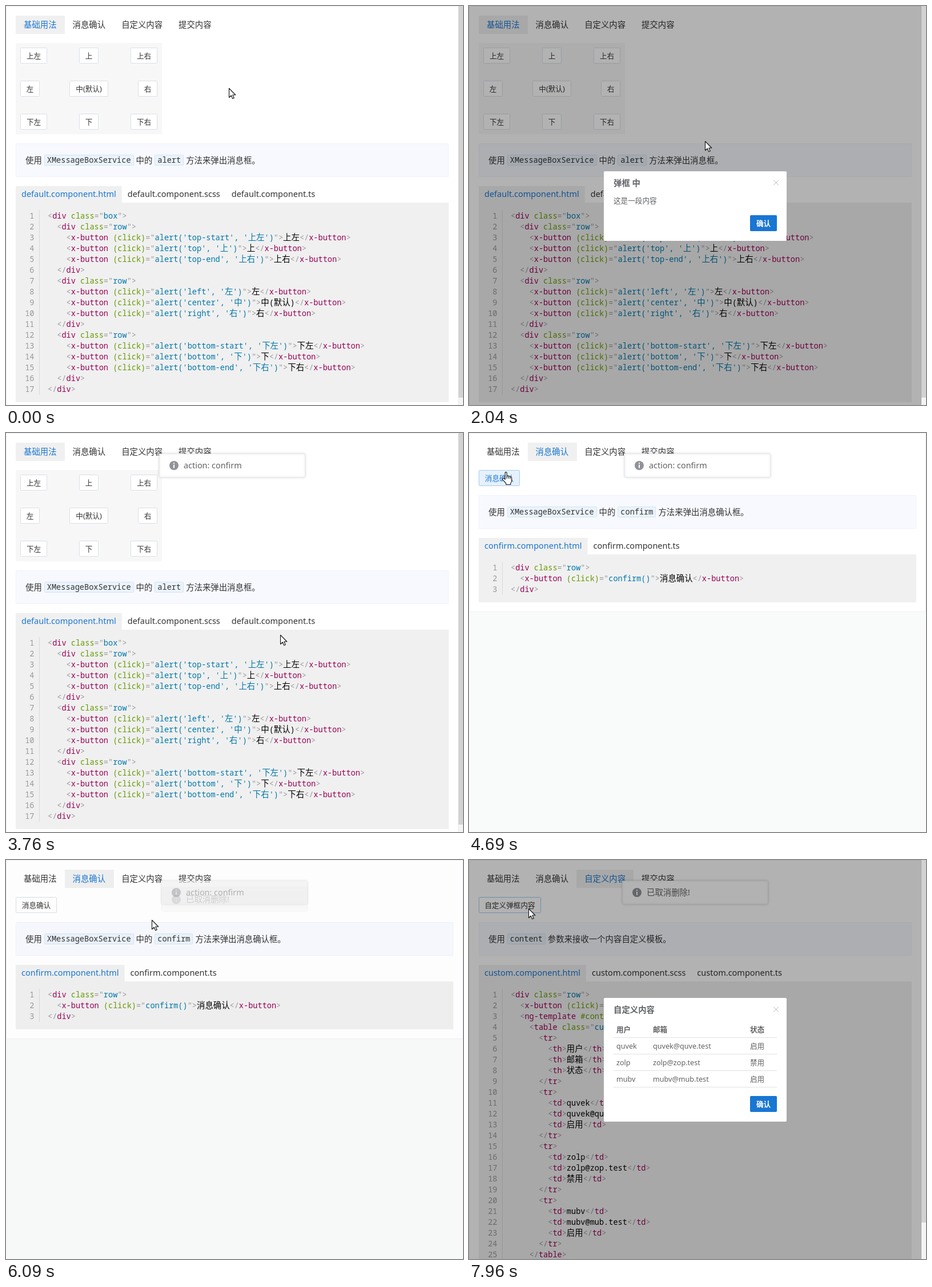
Write an HTML page with a canvas that moves like this. It is 800x700 px and loops after 8 s.

```html
<!DOCTYPE html>
<html lang="zh-CN">
<head>
<meta charset="utf-8">
<title>Message box demo</title>
<style>
html, body { margin: 0; width: 100%; height: 100%; overflow: hidden; background: #f9fafa; }
canvas { display: block; }
</style>
</head>
<body>
<canvas id="stage" width="800" height="700"></canvas>
<script>
const ctx = document.getElementById('stage').getContext('2d');
const LOOP = 8000, STEP = 156.2, MASK = 0.3;
const SANS = '"Noto Sans", "Noto Sans CJK SC", "Noto Sans CJK", sans-serif';
const CJK = '"Noto Sans CJK SC", "Noto Sans CJK", sans-serif';
const MONO = '"Noto Sans Mono", "Noto Sans CJK SC", monospace';
const font = (size, family = SANS, weight = '') => `${weight} ${size}px ${family}`;
const BODY = font(14.4), SMALL = font(12.6), LATIN = font(14.5);
const CODE = font(13.6, MONO), CODE_CJK = font(14.4, CJK);
const INK = '#333', BLUE = '#1976d2', GREY = '#606266';

const clamp = v => Math.max(0, Math.min(1, v));
const ramp = (t, start, length) => clamp((t - start) / length);

// ---------- content ----------
const button = (click, label) => `    <x-button (click)="alert('${click}', '${label[0] === '中' ? '中' : label}')">${label}</x-button>`;
const row = items => ['  <div class="row">', ...items.map(i => button(...i)), '  </div>'];
const cells = (tag, values) => ['      <tr>', ...values.map(v => `        <${tag}>${v}</${tag}>`), '      </tr>'];
const HEAD = ['用户', '邮箱', '状态'];
const USERS = [
  ['quvek', 'quvek@quve.test', '启用'],
  ['zolp', 'zolp@zop.test', '禁用'],
  ['mubv', 'mubv@mub.test', '启用']
];
const TABS = ['基础用法', '消息确认', '自定义内容', '提交内容'];

const PAGES = [
  {
    width: 792, thumb: 687, height: 711, infoY: 241,
    buttons: [
      ['上左', 25, 73, 47], ['上', 128, 73, 34], ['上右', 218, 73, 47],
      ['左', 25, 131, 34], ['中(默认)', 111, 131, 68], ['右', 231, 131, 34],
      ['下左', 25, 189, 47], ['下', 128, 189, 34], ['下右', 218, 189, 47]
    ],
    info: ['使用', '`XMessageBoxService', '中的', '`alert', '方法来弹出消息框。'],
    files: ['default.component.html', 'default.component.scss', 'default.component.ts'],
    code: [
      '<div class="box">',
      ...row([['top-start', '上左'], ['top', '上'], ['top-end', '上右']]),
      ...row([['left', '左'], ['center', '中(默认)'], ['right', '右']]),
      ...row([['bottom-start', '下左'], ['bottom', '下'], ['bottom-end', '下右']]),
      '</div>'
    ]
  },
  {
    width: 800, height: 313, infoY: 109,
    buttons: [['消息确认', 17, 65, 72]],
    info: ['使用', '`XMessageBoxService', '中的', '`confirm', '方法来弹出消息确认框。'],
    files: ['confirm.component.html', 'confirm.component.ts'],
    code: ['<div class="row">', '  <x-button (click)="confirm()">消息确认</x-button>', '</div>']
  },
  {
    width: 792, thumb: 636, height: 900, infoY: 109,
    buttons: [['自定义弹框内容', 17, 65, 109]],
    info: ['使用', '`content', '参数来接收一个内容自定义模板。'],
    files: ['custom.component.html', 'custom.component.scss', 'custom.component.ts'],
    code: [
      '<div class="row">',
      '  <x-button (click)="alertCustom()">自定义弹框内容</x-button>',
      '  <ng-template #contentTpl>',
      '    <table class="custom-table">',
      ...cells('th', HEAD), ...USERS.flatMap(u => cells('td', u)),
      '    </table>'
    ]
  }
];

const DIALOGS = [
  { open: 1094, close: 2960, height: 122, title: '弹框 中', text: '这是一段内容' },
  { open: 4700, close: 5770, height: 122, title: '消息确认', text: '此操作将永久删除此条数据,是否继续?', cancel: true },
  { open: 7660, close: Infinity, height: 217, title: '自定义内容', table: true }
];

const TOASTS = [
  { start: 3240, end: 5985, text: 'action: confirm' },
  { start: 6030, end: Infinity, text: '已取消删除!' }
];

// time, x, y
const PATH = [
  [0, 390, 144], [200, 390, 144], [312, 330, 147], [780, 132, 128], [1000, 132, 128],
  [1090, 148, 140], [1300, 148, 140], [2030, 413, 237], [2180, 414, 346], [2600, 414, 346],
  [2930, 515, 388], [3700, 515, 388], [4210, 146, 33], [4380, 146, 33], [4680, 63, 68],
  [4900, 63, 68], [5600, 465, 381], [5780, 465, 381], [6092, 255, 105], [6400, 240, 35],
  [6750, 240, 35], [7180, 130, 80], [7490, 104, 85], [8000, 104, 85]
];

// ---------- drawing helpers ----------
function rect(x, y, w, h, color) {
  ctx.fillStyle = color;
  ctx.fillRect(x, y, w, h);
}

function panel(x, y, w, h, fill, border, radius = 1) {
  ctx.beginPath();
  ctx.roundRect(x + 0.5, y + 0.5, w - 1, h - 1, radius);
  ctx.fillStyle = fill;
  ctx.fill();
  ctx.strokeStyle = border;
  ctx.lineWidth = 1;
  ctx.stroke();
}

// Draws text and returns where it ends.
function text(str, x, y, face, color) {
  ctx.font = face;
  ctx.fillStyle = color;
  ctx.fillText(str, x, y);
  return x + ctx.measureText(str).width;
}

function textWidth(str, face) {
  ctx.font = face;
  return ctx.measureText(str).width;
}

// ---------- code block ----------
function tokens(line) {
  const out = [];
  for (const [all, open, name, attrs, end] of line.matchAll(/(<\/?)([\w-]+)([^>]*)(>)|[^<]+/g)) {
    if (!open) { out.push([all, '#000']); continue; }
    out.push([open, '#999'], [name, '#905']);
    for (const [, gap, key, eq, value, quote] of attrs.matchAll(/(\s*)([^=\s]+)(?:(=")([^"]*)("))?/g)) {
      out.push([gap + key, '#690']);
      if (eq) out.push([eq, '#999'], [value, '#07a'], [quote, '#999']);
    }
    out.push([end, '#999']);
  }
  return out;
}

function codeLine(line, y) {
  let x = 73;
  for (const [str, color] of tokens(line)) {
    for (const part of str.split(/([\u2e80-\uffff]+)/)) {
      if (part) x = text(part, x, y, part[0] > '\u2e80' ? CODE_CJK : CODE, color);
    }
  }
}

function codeBlock(page, y) {
  const right = page.width - 17, top = y + 28.5, n = page.code.length;
  let x = 17;
  page.files.forEach((file, i) => {
    const w = textWidth(file, LATIN) + 20;
    if (!i) rect(x, y, w, 29, '#f0f0f0');
    text(file, x + 10, y + 19, LATIN, i ? INK : BLUE);
    x += w;
  });
  rect(17, Math.round(top), right - 17, n * 19 + 27, '#f0f0f0');
  rect(58, Math.round(top) + 13, 1, n * 19 + 1, '#d9d9d9');
  page.code.forEach((line, i) => {
    const base = Math.round(top) + 27.5 + i * 19;
    const num = String(i + 1);
    text(num, 49.5 - textWidth(num, CODE), base, CODE, '#999');
    codeLine(line, base);
  });
}

// ---------- page ----------
function drawButton([label, x, y, w], mouse, masked) {
  const near = inside(mouse, x, y, w, 28);
  const hot = near && !masked;
  panel(x, y, w, 28, hot ? '#e6f1fc' : '#fff', near ? '#a5cdf0' : '#d9dfe8');
  text(label, x + (w - textWidth(label, SMALL)) / 2, y + 18.5, SMALL, hot ? BLUE : INK);
}

const inside = (p, x, y, w, h) => p.x >= x && p.x < x + w && p.y >= y && p.y < y + h;

function drawPage(index, mouse, masked) {
  const page = PAGES[index], w = page.width;
  rect(0, 0, 800, 700, '#f9fafa');
  panel(0, 0, w, page.height + 1, '#fff', '#eff1f5', 0);

  let x = 17;
  TABS.forEach((label, i) => {
    const tw = textWidth(label, BODY) + 28;
    const over = inside(mouse, x, 17, tw, 32) && !masked;
    if (i === index) {
      ctx.beginPath();
      ctx.roundRect(Math.round(x), 17, Math.round(tw), 32, 1);
      ctx.fillStyle = '#f0f0f0';
      ctx.fill();
    }
    text(label, x + 14, 38, BODY, i === index || over ? BLUE : INK);
    x += tw;
  });

  if (!index) rect(17, 65, 256, 160, '#f7f7f7');
  page.buttons.forEach(b => drawButton(b, mouse, masked));

  const y = page.infoY;
  panel(17, y, w - 34, 59, '#f7f9fe', '#f0f3fa');
  x = 34;
  for (const part of page.info) {
    if (part[0] === '`') {
      const name = part.slice(1), pw = textWidth(name, CODE) + 10;
      panel(Math.round(x), y + 20, Math.round(pw), 19, '#ebf3fb', '#d3e5f5');
      text(name, x + 5, y + 34, CODE, INK);
      x += pw + 4;
    } else {
      x = text(part, x, y + 34.5, BODY, INK) + 4;
    }
  }
  codeBlock(page, y + 75);

  if (page.thumb) {
    rect(792, 0, 8, 700, '#f4f4f4');
    rect(792, 0, 8, page.thumb, '#d2d2d2');
  }
}

function drawToast({ start, end, text: label }, t, center) {
  const enter = ramp(t, start, 270), alpha = enter * (1 - ramp(t, end, 260));
  if (alpha <= 0) return;
  const x = center - 128, y = 36 + 16 * (1 - enter);
  ctx.save();
  ctx.globalAlpha = alpha;
  ctx.shadowColor = 'rgba(0,0,0,.14)';
  ctx.shadowBlur = 4;
  panel(x, y, 256, 42, '#fff', '#e6e9ef', 2);
  ctx.shadowColor = 'transparent';
  ctx.beginPath();
  ctx.arc(x + 26, y + 21, 8, 0, 7);
  ctx.fillStyle = '#909399';
  ctx.fill();
  rect(x + 25, y + 16, 2, 2, '#fff');
  rect(x + 25, y + 19.5, 2, 6, '#fff');
  text(label, x + 43, y + 26, BODY, GREY);
  ctx.restore();
}

function drawTable(x, y) {
  const cols = [5, 69, 239];
  [HEAD, ...USERS].forEach((line, i) => {
    const face = font(12.6, SANS, i ? '' : 'bold');
    line.forEach((cell, c) => text(cell, x + cols[c], y + 29 * i, face, GREY));
    rect(x, y + 29 * i + 9, 286, 1, '#dfe1e6');
  });
}

function drawDialog(d, t, center) {
  const enter = ramp(t, d.open, 290);
  const alpha = enter * (1 - ramp(t, d.close, 140));
  const mask = MASK * ramp(t, d.open, 195) * (1 - ramp(t, d.close + 145, 182));
  if (mask > 0) rect(0, 0, center * 2, 700, `rgba(0,0,0,${mask})`);
  if (alpha <= 0) return;

  const x = center - 160, y = Math.round(350.5 - d.height / 2 - 29 * (1 - enter)), h = d.height;
  const bold = font(12.6, SANS, 'bold');
  ctx.save();
  ctx.globalAlpha = alpha;
  ctx.beginPath();
  ctx.roundRect(x, y, 320, h, 2);
  ctx.fillStyle = '#fff';
  ctx.fill();
  text(d.title, x + 17, y + 26, font(14.4, SANS, 'bold'), GREY);

  ctx.beginPath();
  for (const s of [-1, 1]) {
    ctx.moveTo(x + 297, y + 20 - 4.5 * s);
    ctx.lineTo(x + 306, y + 20 + 4.5 * s);
  }
  ctx.strokeStyle = '#b4b7bd';
  ctx.lineWidth = 1;
  ctx.stroke();

  if (d.table) drawTable(x + 17, y + 60);
  else text(d.text, x + 17, y + 55.5, SMALL, GREY);

  const by = y + h - 45;
  if (d.cancel) {
    panel(x + 201, by, 47, 28, '#fff', '#d9dfe8');
    text('取消', x + 212, by + 18.5, SMALL, INK);
  }
  panel(x + 256, by, 47, 28, BLUE, BLUE);
  text('确认', x + 267, by + 18.5, bold, '#fff');
  ctx.restore();
}

// ---------- pointer ----------
const ARROW = new Path2D('M.5 .5V16.5L4.2 13 6.7 18.6 9.2 17.5 6.8 12H11.8Z');
const HAND = new Path2D('M.2 13V2.2Q.2 .6 1.7 .6T3.2 2.2V8Q5.6 6.4 6.4 8.4 8.6 7 9.2 9.1 11.7 8.2 11.7 11V15.5Q11.6 18 9.8 20V22.5H1.8V20.3L-4.2 13.6Q-5 11.6-3.2 11.2-2 11.1 .2 13.4ZM3.2 8V12M6.3 9V12M9.2 9.5V12.5');

function pointerAt(t) {
  const i = Math.max(1, PATH.findIndex(p => p[0] >= t));
  const [t0, x0, y0] = PATH[i - 1], [t1, x1, y1] = PATH[i];
  const k = (t - t0) / (t1 - t0);
  return { x: Math.round(x0 + (x1 - x0) * k), y: Math.round(y0 + (y1 - y0) * k) };
}

function drawPointer(mouse, hand) {
  ctx.save();
  ctx.translate(mouse.x, mouse.y);
  ctx.lineJoin = 'round';
  ctx.lineWidth = 1.1;
  ctx.fillStyle = '#fff';
  ctx.strokeStyle = '#111';
  ctx.fill(hand ? HAND : ARROW);
  ctx.stroke(hand ? HAND : ARROW);
  ctx.restore();
}

function isHand(mouse, page, dialog, center) {
  if (!dialog) {
    return page.buttons.some(([, x, y, w]) => inside(mouse, x, y, w, 28)) || inside(mouse, 17, 17, 358, 32);
  }
  const by = 350 + dialog.height / 2 - 45;
  return inside(mouse, center + 96, by, 47, 28) || (dialog.cancel && inside(mouse, center + 41, by, 47, 28));
}

// ---------- timeline ----------
function draw(t) {
  const index = t < 4300 ? 0 : t < 6680 ? 1 : 2;
  const page = PAGES[index], center = page.width / 2;
  const mouse = pointerAt(t);
  const dialog = DIALOGS.find(d => t > d.open && t < d.close + 327);
  drawPage(index, mouse, !!dialog);
  TOASTS.forEach(m => drawToast(m, t, center));
  if (dialog) drawDialog(dialog, t, center);
  const live = dialog && t < dialog.close + 140;
  drawPointer(mouse, dialog && !live ? false : isHand(mouse, page, dialog, center));
}

const begin = performance.now();
function tick(now) {
  const t = Math.max(0, now - begin) % LOOP;
  draw(Math.floor((t + 8) / STEP) * STEP);
  requestAnimationFrame(tick);
}
draw(0);
requestAnimationFrame(tick);
</script>
</body>
</html>
```
